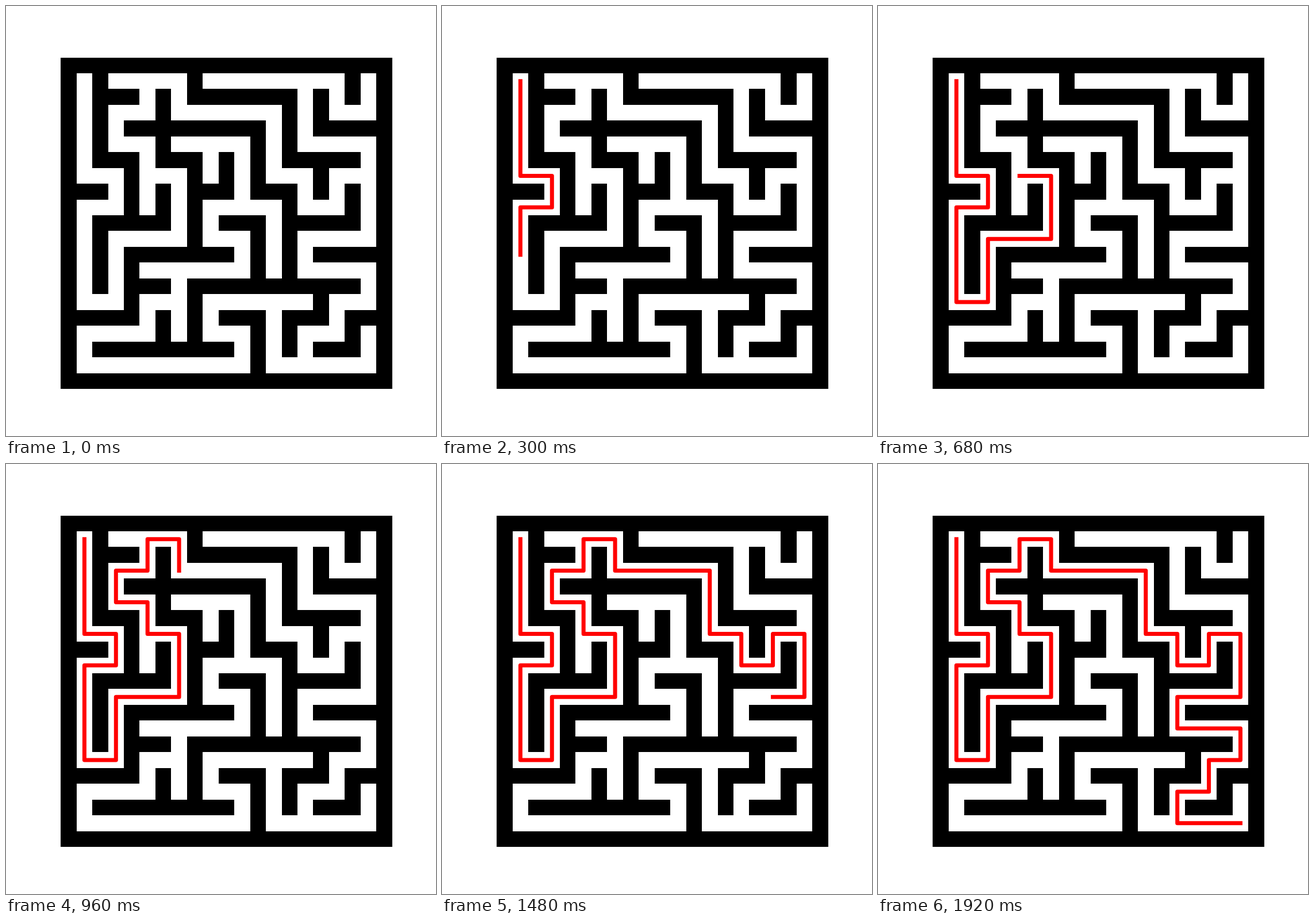
An HTML page for the animation above (1940 ms loop, 748 px wide and 748 px high).

```html
<!DOCTYPE html>
<html lang="en">
<head>
<meta charset="utf-8">
<title>Maze</title>
<style>
  html, body { margin: 0; width: 100%; height: 100%; overflow: hidden; background: #fff; }
  svg { display: block; width: 748px; height: 748px; }
  path { fill: none; stroke-linecap: square; }
  .walls { shape-rendering: crispEdges; }
  .halls { stroke: #fff; stroke-width: .5; }
  #trail { stroke: #f00; stroke-width: .1275; stroke-linejoin: round; }
</style>
</head>
<body>
<svg viewBox="0 0 748 748">
  <!-- one unit is the distance between neighbouring junctions -->
  <g transform="translate(136.4 130.7) scale(54.9)">
    <g class="walls">
      <rect x="-.75" y="-.75" width="10.5" height="10.5"/>
      <path class="halls" id="route"/>
      <path class="halls" d="M1 0H2 M4 0H8V1H9V0 M7 0V2H9V3 M2 3V4 M3 2H5V4 M4 2V3
        M6 6V4H4V5H5V6H2 M3 6V8 M3 7H2V8H0V9H5V8H4V7H7 M6 7V9H7 M9 8V9"/>
    </g>
    <path id="trail"/>
  </g>
</svg>
<script>
  const solution = "M0 0V3H1V4H0V7H1V5H3V3H2V2H1V1H2V0H3V1H6V3H7V4H8V3H9V5H7V6H9V7H8V8H7V9H9";
  const STEP_MS = 20, STEPS = 97;
  const trail = document.getElementById("trail");
  for (const path of [trail, document.getElementById("route")]) path.setAttribute("d", solution);

  const start = performance.now();
  function draw(now) {
    // the trail grows by half a unit per step
    const step = Math.floor(Math.max(0, now - start) / STEP_MS) % STEPS;
    trail.style.visibility = step ? "visible" : "hidden";
    trail.setAttribute("stroke-dasharray", `${step / 2} 99`);
    requestAnimationFrame(draw);
  }
  draw(start);
</script>
</body>
</html>
```
